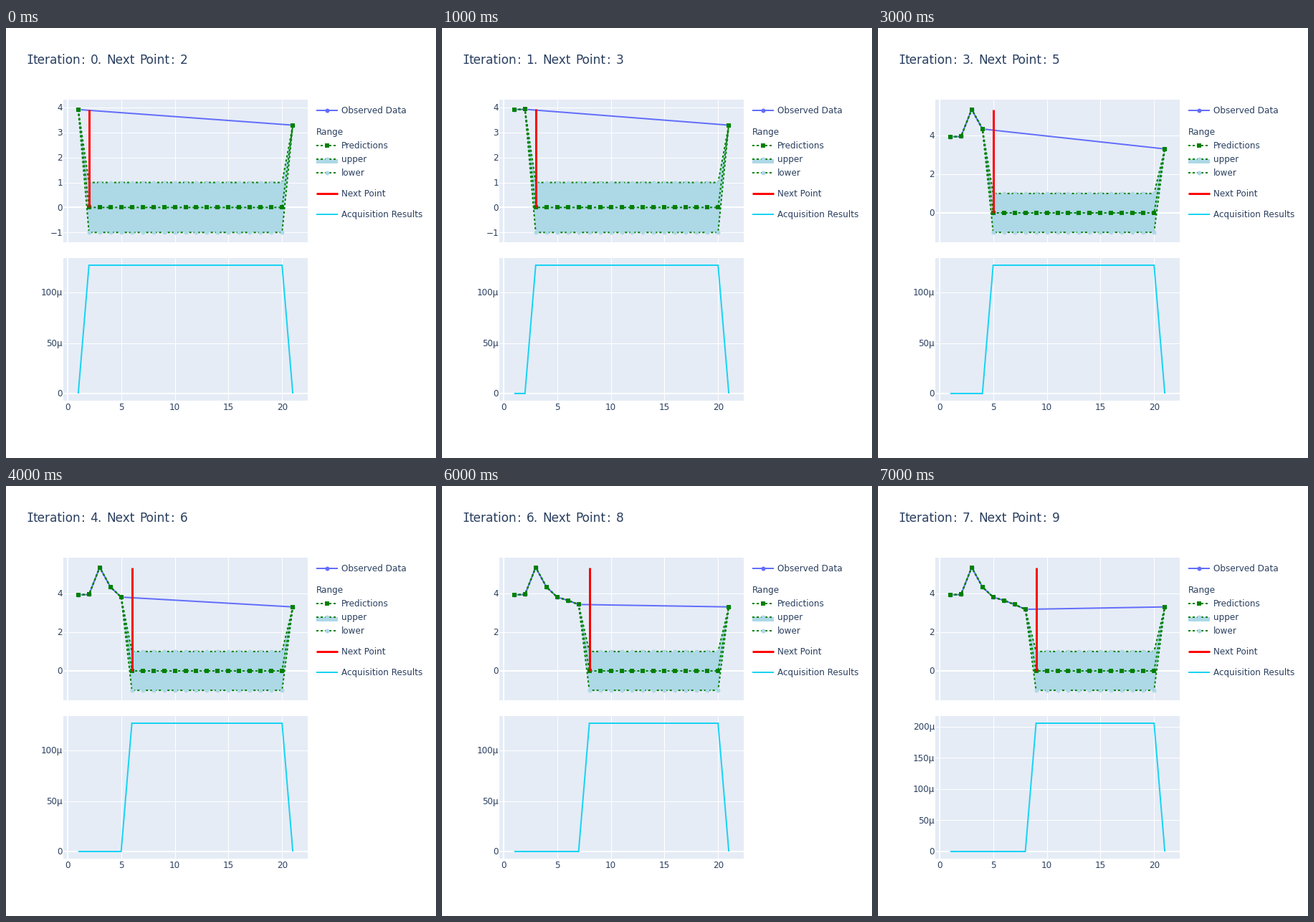
Write a matplotlib script that moves like this. It is 600 by 600 pixels and loops after 8 s.

```python
import matplotlib.pyplot as plt
import numpy as np
from matplotlib.animation import FuncAnimation
from matplotlib.patches import Rectangle

SIZE, DPI = 600, 100
PT = 72 / DPI  # points per pixel
LEFT, RIGHT = 80, 421
TOP, BOTTOM = (100, 299), (321, 520)

INK, PANEL = "#2a3f5f", "#e5ecf6"
BLUE, CYAN = "#636efa", "#19d3f3"
GREEN, PALE, RED = "#008000", "#add8e6", "#ff0000"

XS = np.arange(1, 22)
SAMPLES = [3.92, 3.93, 5.33, 4.32, 3.80, 3.63, 3.42, 3.17]
LAST = 3.295

plt.rcParams["font.family"] = "DejaVu Sans"
fig = plt.figure(figsize=(SIZE / DPI, SIZE / DPI), dpi=DPI, facecolor="white")
ax = fig.add_axes([0, 0, 1, 1])


def px(x):
    return 85.83 + 14.97 * np.asarray(x)


def line(x, y, color, width=2, dotted=False, z=3):
    style = (0, (3 / width, 3 / width)) if dotted else "-"
    ax.plot(x, y, color=color, lw=width * PT, ls=style, zorder=z,
            solid_capstyle="butt", dash_capstyle="butt",
            solid_joinstyle="miter", dash_joinstyle="miter")


def dots(x, y, color, marker="o", z=3):
    ax.plot(x, y, ls="none", marker=marker, color=color, ms=6 * PT,
            mew=0, zorder=z)


def box(x, y, w, h, color, z=0):
    ax.add_patch(Rectangle((x, y), w, h, fc=color, ec="none", zorder=z))


def label(x, y, text, size=12, ha="left", **kw):
    ax.text(x, y, text, fontsize=size * PT, color=INK, ha=ha,
            va="baseline", zorder=9, **kw)


def panel(span, ticks, to_y, unit=""):
    y0, y1 = span
    box(LEFT, y0, RIGHT - LEFT, y1 - y0, PANEL)
    for x in range(0, 21, 5):
        line([px(x)] * 2, [y0, y1], "white", 1 if x else 2, z=1)
    for v in ticks:
        y = to_y(v)
        line([LEFT, RIGHT], [y, y], "white", 1 if v else 2, z=1)
        text = f"{v}{unit if v else ''}".replace("-", "\u2212")
        label(79, y + 4.3, text, ha="right")


def title(step):
    y, size = 50, 17
    label(33.6, y, "I", size, ha="center", family="DejaVu Sans Mono")
    words = [(37.1, "teration"), (104.9, ":"), (117.6, f"{step}."),
             (140.5, "Next"), (186.1, "Point"), (229.6, ":"),
             (242.5, f"{step + 2}")]
    for x, word in words:
        label(x, y, word, size)


def legend():
    a, mid, b = 433, 448, 463
    line([a, b], [114.5] * 2, BLUE)
    dots([mid], [114.5], BLUE)
    box(a, 182.5, b - a, 6, PALE, 2)
    for y, color, marker in [(163.5, GREEN, "s"), (182.5, PALE, "o"),
                             (201.5, PALE, "o")]:
        line([a, b], [y, y], GREEN, dotted=True)
        dots([mid], [y], color, marker)
    line([a, b], [230.5] * 2, RED, 3)
    line([a, b], [259.5] * 2, CYAN)
    rows = [(114.5, "Observed Data"), (163.5, "Predictions"),
            (182.5, "upper"), (201.5, "lower"), (230.5, "Next Point"),
            (259.5, "Acquisition Results")]
    for y, text in rows:
        label(468, y + 4.5, text)
    label(433, 149, "Range")


def draw(step):
    ax.clear()
    ax.set_xlim(0, SIZE)
    ax.set_ylim(SIZE, 0)
    ax.axis("off")

    seen = step + 1
    known = np.zeros(len(XS), bool)
    known[:seen] = known[-1] = True
    mean = np.zeros(len(XS))
    mean[:seen] = SAMPLES[:seen]
    mean[-1] = LAST
    sd = np.where(known, 0, 1)
    x = px(XS)

    if step < 2:
        ticks, zero, scale = range(-1, 5), 250.4, 34.85
    else:
        ticks, zero, scale = (0, 2, 4), 258, 27.1

    def to_y(v):
        return zero - scale * np.asarray(v)

    panel(TOP, ticks, to_y)
    upper, lower = to_y(mean + sd), to_y(mean - sd)
    ax.fill_between(x, upper, lower, fc=PALE, ec="none", lw=0, zorder=2)
    line(x[known], to_y(mean[known]), BLUE)
    dots(x[known], to_y(mean[known]), BLUE)
    for edge in (lower, upper):
        line(x, edge, GREEN, dotted=True, z=4)
        dots(x, edge, PALE, z=4)
    line(x, to_y(mean), GREEN, dotted=True, z=5)
    dots(x, to_y(mean), GREEN, "s", z=5)
    line([x[seen]] * 2, to_y([0, mean.max()]), RED, 3, z=6)

    # acquisition, in millionths
    level, top_tick = (205.7, 200) if step == 7 else (127.1, 100)
    gain = 179 / level
    panel(BOTTOM, range(0, top_tick + 1, 50), lambda v: 510 - gain * v, "\u00b5")
    line(x, 510 - 179 * sd, CYAN)
    for v in range(0, 21, 5):
        label(px(v), 533, str(v), ha="center")

    title(step)
    legend()
    return []


anim = FuncAnimation(fig, draw, frames=8, interval=1000, repeat=True,
                     repeat_delay=0, init_func=lambda: draw(0), blit=False)
plt.show()
```
